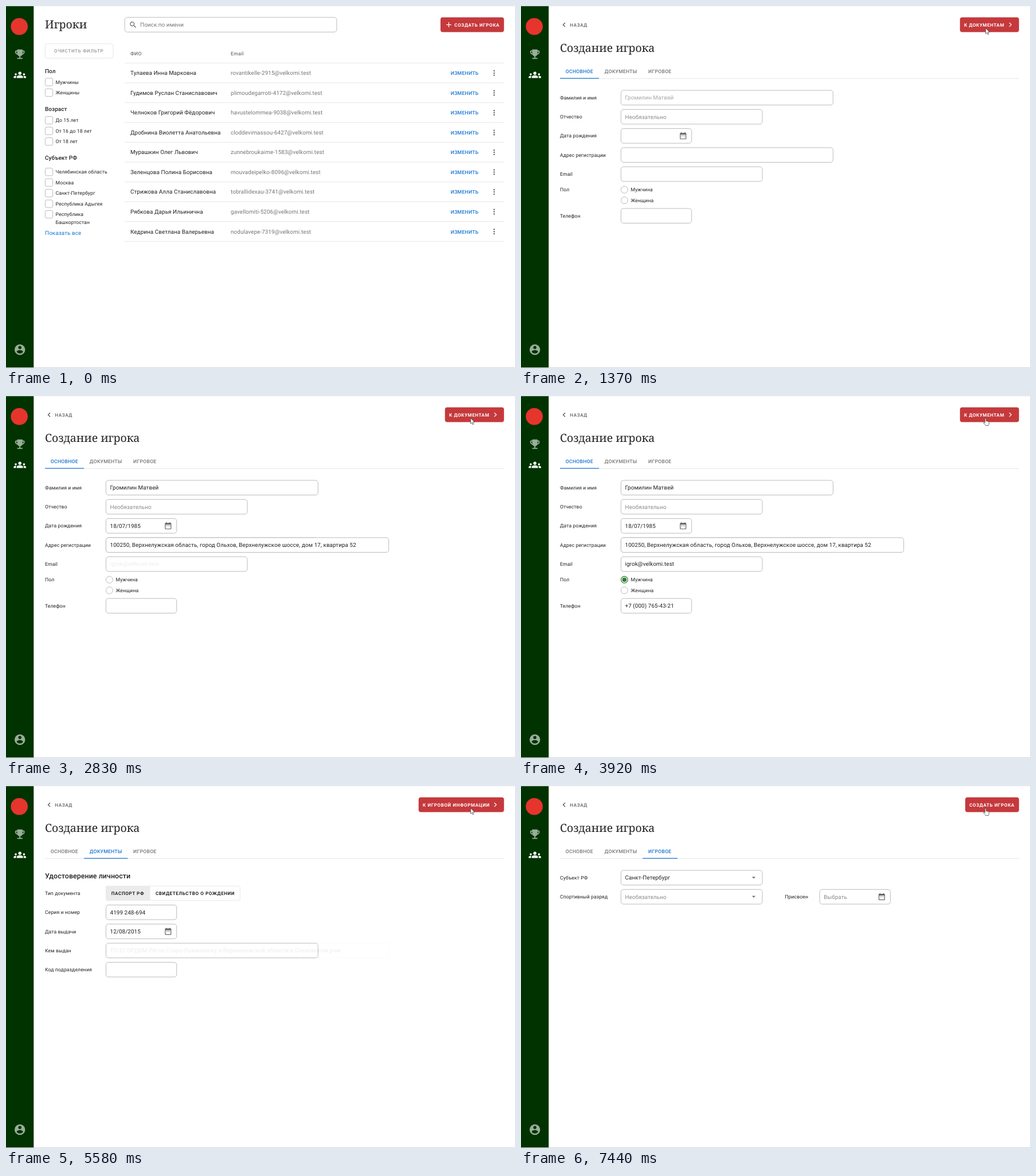
Recreate the animation shown at these times as an HTML page. Size 888 by 631 pixels, loop 8000 ms.

```html
<!DOCTYPE html>
<html lang="ru">
<head>
<meta charset="utf-8">
<title>Игроки</title>
<style>
  html, body { margin: 0; width: 100%; height: 100%; overflow: hidden; background: #fff; }
  svg { display: block; width: 888px; height: 631px; }
  text { font-family: Roboto, sans-serif; text-rendering: geometricPrecision; white-space: pre; fill: #212121; }
  .body { font-size: 9.87px; letter-spacing: .092px; }
  .small { font-size: 8.63px; letter-spacing: .1px; }
  .head { font-size: 9.87px; letter-spacing: .092px; font-weight: 500; }
  .sub { font-size: 12.33px; letter-spacing: .092px; font-weight: 500; }
  .caps { font-size: 8.63px; letter-spacing: .25px; font-weight: 500; }
  .btn { font-size: 8.02px; letter-spacing: .62px; font-weight: 700; }
  .title { font: 500 19.5px "Noto Serif", serif; }
  .grey { fill: #757575; }
  .hint { fill: #8a8a8a; }
  .blue { fill: #1976d2; }
  .white { fill: #fff; }
  .off { fill: #a6a6a6; }
  .box { fill: #fff; stroke: #b8b8b8; stroke-width: .95; }
  .rule { stroke: #e0e0e0; stroke-width: .8; }
</style>
</head>
<body>
<svg id="stage" viewBox="0 0 888 631" xmlns="http://www.w3.org/2000/svg"></svg>
<script>
const LOOP = 8000, TICK = 67;

const ICON = {
  cup: 'M19 5h-2V3H7v2H5c-1.1 0-2 .9-2 2v1c0 2.55 1.92 4.63 4.39 4.94.63 1.5 1.98 2.63 3.61 2.96V19H7v2h10v-2h-4v-3.1c1.63-.33 2.98-1.46 3.61-2.96C19.08 12.63 21 10.55 21 8V7c0-1.1-.9-2-2-2zM5 8V7h2v3.82C5.84 10.4 5 9.3 5 8zm14 0c0 1.3-.84 2.4-2 2.82V7h2v1z',
  group: 'M12 12.75c1.63 0 3.07.39 4.24.9 1.08.48 1.76 1.56 1.76 2.73V18H6v-1.61c0-1.18.68-2.26 1.76-2.73 1.17-.52 2.61-.91 4.24-.91zM4 13a2 2 0 1 0 0-4 2 2 0 0 0 0 4zm1.13 1.1C4.76 14 4.39 14 4 14c-.99 0-1.93.21-2.78.58C.48 14.9 0 15.62 0 16.43V18h4.5v-1.61c0-.83.23-1.61.63-2.29zM20 13a2 2 0 1 0 0-4 2 2 0 0 0 0 4zm4 3.43c0-.81-.48-1.53-1.22-1.85C21.93 14.21 21 14 20 14c-.39 0-.76 0-1.13.1.4.68.63 1.46.63 2.29V18H24zM12 6a3 3 0 1 1 0 6 3 3 0 0 1 0-6z',
  user: 'M12 2a10 10 0 1 0 0 20 10 10 0 0 0 0-20zm0 3a3 3 0 1 1 0 6 3 3 0 0 1 0-6zm0 14.2c-2.5 0-4.71-1.28-6-3.22.03-1.99 4-3.08 6-3.08s5.97 1.09 6 3.08c-1.29 1.94-3.5 3.22-6 3.22z',
  search: 'M15.5 14h-.79l-.28-.27A6.5 6.5 0 1 0 9.5 16c1.61 0 3.09-.59 4.23-1.57l.27.28v.79l5 4.99L20.49 19zm-6 0a4.5 4.5 0 1 1 0-9 4.5 4.5 0 0 1 0 9z',
  date: 'M9 11H7v2h2zm4 0h-2v2h2zm4 0h-2v2h2zm2-7h-1V2h-2v2H8V2H6v2H5a2 2 0 0 0-2 2v14c0 1.1.9 2 2 2h14c1.1 0 2-.9 2-2V6a2 2 0 0 0-2-2zm0 16H5V9h14z'
};

// Drawing helpers
const text = (x, y, s, cls = 'body') => `<text x="${x}" y="${y}" class="${cls}">${s}</text>`;
const rect = (x, y, w, h, r, attrs) => `<rect x="${x}" y="${y}" width="${w}" height="${h}" rx="${r}" ${attrs}/>`;
const line = (x1, x2, y, attrs = 'class="rule"') => `<path d="M${x1} ${y}H${x2}" ${attrs}/>`;
const icon = (name, x, y, fill, k = .617) =>
  `<path d="${ICON[name]}" fill="${fill}" transform="translate(${x} ${y}) scale(${k}) translate(-12 -12)"/>`;
const circle = (x, y, r, attrs) => `<circle cx="${x}" cy="${y}" r="${r}" ${attrs}/>`;
const chevron = (x, y, dir, color) =>
  `<path d="M${x - 1.8 * dir} ${y - 3.5}l${3.5 * dir} 3.5l${-3.5 * dir} 3.5" fill="none" stroke="${color}" stroke-width="1.25"/>`;
const shown = (from, to, s) => `<g data-from="${from}" data-to="${to}">${s}</g>`;
const fadeIn = (at, s) => `<g data-fade="${at}">${s}</g>`;

const box = (x, cy, w) => rect(x, cy - 12.8, w, 25.6, 4.3, 'class="box"');
const value = (cy, s, cls) => text(181.5, cy + 3.4, s, cls);
const label = (cy, s, x = 68) => text(x, cy + 3, s, 'small');
const calendar = (x, cy) => icon('date', x, cy, '#666');
const caret = cy => `<path d="M402.9 ${cy - 1.5}h6.2l-3.1 3.1z" fill="#757575"/>`;

function redButton(x, s, mark = '') {
  return rect(x, 19.8, 868.8 - x, 25.6, 4, 'fill="#c5393c"') + mark + text(x + (mark[1] === 'g' ? 24.3 : 7.2), 35.6, s, 'btn white');
}

function sidebar() {
  return rect(0, 0, 48.3, 630, 0, 'fill="#003300"') +
    line(0, 888, .2, 'stroke="#e4e4e4" stroke-width=".5"') +
    line(0, 888, 630.5, 'stroke="#d4d4d4"') +
    circle(23.2, 35.8, 14.8, 'fill="#e5352d"') +
    icon('cup', 24.2, 84, '#99ad99', .925) +
    icon('group', 24.2, 120, '#fff', .9) +
    icon('user', 24.2, 599, '#99ad99', .925);
}

function listPage() {
  const people = [
    ['Тулаева Инна Марковна', 'rovantikelle-2915'],
    ['Гудимов Руслан Станиславович', 'plimoudegarroti-4172'],
    ['Челноков Григорий Фёдорович', 'havustelommea-9038'],
    ['Дробнина Виолетта Анатольевна', 'cloddevimassou-6427'],
    ['Мурашкин Олег Львович', 'zunnebroukaime-1583'],
    ['Зеленцова Полина Борисовна', 'mouvadeipelko-8096'],
    ['Стрижова Алла Станиславовна', 'tobrallidexau-3741'],
    ['Рябкова Дарья Ильинична', 'gavellomiti-5206'],
    ['Кедрина Светлана Валерьевна', 'nodulavepe-7319']
  ];
  const checks = [
    [132.5, 'Мужчины'], [151, 'Женщины'],
    [199.2, 'До 15 лет'], [217.7, 'От 16 до 18 лет'], [236.2, 'От 18 лет'],
    [289.2, 'Челябинская область'], [307.7, 'Москва'], [326.2, 'Санкт-Петербург'],
    [344.7, 'Республика Адыгея'], [363.2, 'Республика']
  ];
  const plus = '<g><path d="M768.2 32.6h8.6M772.5 28.3v8.6" stroke="#fff" stroke-width="1.25"/></g>';
  let s = text(68, 39.3, 'Игроки', 'title') +
    box(207.2, 32.6, 369.8) + icon('search', 221.8, 32.8, '#666') + text(234, 36, 'Поиск по имени', 'body grey') +
    redButton(758, 'СОЗДАТЬ ИГРОКА', plus) +
    rect(68.3, 65.7, 118.6, 25.3, 4, 'fill="#fff" stroke="#e0e0e0" stroke-width=".8"') +
    text(84, 81.3, 'ОЧИСТИТЬ ФИЛЬТР', 'btn off') +
    text(68, 116.5, 'Пол', 'head') + text(68, 183.2, 'Возраст', 'head') + text(68, 268.3, 'Субъект РФ', 'head') +
    text(86.5, 380, 'Башкортостан', 'small') + text(68, 399, 'Показать все', 'body blue') +
    text(217, 85.6, 'ФИО', 'caps grey') + text(392, 85.6, 'Email', 'caps grey') + line(207, 869, 99.4);
  for (const [y, name] of checks)
    s += rect(68.4, y - 6.6, 13.2, 13.2, 2.2, 'class="box"') + text(86.5, y + 3, name, 'small');
  people.forEach(([name, mail], i) => {
    const y = 116.9 + 34.53 * i;
    s += text(217, y + 3.4, name) + text(392, y + 3.4, mail + '@velkomi.test', 'body grey') +
      text(775.8, y + 3.4, 'ИЗМЕНИТЬ', 'caps blue') + line(207, 869, y + 17.1);
    for (const d of [-3.8, 0, 3.8]) s += circle(851.6, y + d, 1.25, 'fill="#666"');
  });
  return s;
}

function formPage(active, button, x, next, content) {
  const tabs = [['ОСНОВНОЕ', 68, 136], ['ДОКУМЕНТЫ', 136, 212.3], ['ИГРОВОЕ', 212.3, 273]];
  let s = chevron(75.2, 32.8, -1, '#555') + text(85.3, 35.7, 'НАЗАД', 'btn grey') +
    text(68, 79.8, 'Создание игрока', 'title') +
    redButton(x, button, next ? chevron(853.7, 32.6, 1, '#fff') : '') +
    line(68, 869, 126.5);
  tabs.forEach(([name, a, b], i) => {
    s += text(a + 9.8, 117.2, name, 'caps ' + (i === active ? 'blue' : 'grey'));
    if (i === active) s += line(a, b, 126.2, 'stroke="#1976d2" stroke-width="1.2"');
  });
  return s + content;
}

function mainTab() {
  const X = 174.4;
  const address = '100250, Верхнелужская область, город Ольхов, Верхнелужское шоссе, дом 17, квартира 52';
  return label(159.8, 'Фамилия и имя') + box(X, 159.8, 370) + fadeIn(1300, value(159.8, 'Громилин Матвей')) +
    label(193.1, 'Отчество') + box(X, 193.1, 246.6) + value(193.1, 'Необязательно', 'body hint') +
    label(226.4, 'Дата рождения') + box(X, 226.4, 123.3) + calendar(282.8, 226.2) + fadeIn(1840, value(226.4, '18/07/1985')) +
    label(259.7, 'Адрес регистрации') + box(X, 259.7, 370) + fadeIn(2310, box(X, 259.7, 493.3) + value(259.7, address)) +
    label(293, 'Email') + box(X, 293, 246.6) + fadeIn(2770, value(293, 'igrok@velkomi.test')) +
    label(320.2, 'Пол') + label(320.2, 'Мужчина', 191.5) + label(338.7, 'Женщина', 191.5) +
    circle(180.4, 320.2, 6, 'class="box"') + circle(180.4, 338.7, 6, 'class="box"') +
    fadeIn(3180, circle(180.4, 320.2, 5.8, 'fill="#fff" stroke="#2e7d32" stroke-width="1.1"') + circle(180.4, 320.2, 3.8, 'fill="#2e7d32"')) +
    label(365.7, 'Телефон') + box(X, 365.7, 123.3) + fadeIn(3650, value(365.7, '+7 (000) 765-43-21'));
}

function papersTab() {
  const X = 174.4;
  const issuer = 'ТП 57 ОРДКМ РФ по Старо-Лужановску и Верхнелужской области в Ольховском р-не';
  return text(68, 161, 'Удостоверение личности', 'sub') +
    label(187, 'Тип документа') +
    rect(X, 174.4, 234, 25, 2.5, 'fill="#fff" stroke="#e4e4e4" stroke-width=".8"') +
    rect(174, 174, 77.5, 25.8, 2.5, 'fill="#ebebeb"') +
    text(183.8, 189.9, 'ПАСПОРТ РФ', 'btn') + text(261, 189.9, 'СВИДЕТЕЛЬСТВО О РОЖДЕНИИ', 'btn') +
    label(220.2, 'Серия и номер') + box(X, 220.2, 123.3) + fadeIn(4720, value(220.2, '4199 248-694')) +
    label(253.5, 'Дата выдачи') + box(X, 253.5, 123.3) + calendar(282.8, 253.3) + fadeIn(5180, value(253.5, '12/08/2015')) +
    label(286.8, 'Кем выдан') + box(X, 286.8, 370) + fadeIn(5580, box(X, 286.8, 493.3) + value(286.8, issuer)) +
    label(320.1, 'Код подразделения') + box(X, 320.1, 123.3) + fadeIn(6050, value(320.1, '123-456'));
}

function gameTab() {
  return label(159.8, 'Субъект РФ') + box(174.4, 159.8, 246.6) + caret(159.8) + fadeIn(7200, value(159.8, 'Санкт-Петербург')) +
    label(193.1, 'Спортивный разряд') + box(174.4, 193.1, 246.6) + value(193.1, 'Необязательно', 'body hint') + caret(193.1) +
    label(193.1, 'Присвоен', 460.3) + box(521.1, 193.1, 123.3) + text(528.3, 196.5, 'Выбрать', 'body hint') + calendar(629.4, 192.9);
}

const pointer = `<g id="pointer">
  <circle id="press" r="7.3" cx="0" cy="1.3" fill="#f5b921" opacity=".9"/>
  <path id="arrow" d="M0 0V9.7L2.2 7.7 3.7 11.2 5.3 10.5 3.8 7.1H6.9Z" fill="#fff" stroke="#333" stroke-width=".7"/>
  <path id="hand" transform="translate(-4.7 .4)" d="M3.5 1.2c0-1.4 2-1.4 2 0V5c.4-.6 1.6-.5 1.8.3.5-.5 1.5-.4 1.7.4.6-.4 1.6 0 1.6.9V9c0 2-1 2.1-1 3.4H4.6c0-1.2-2.2-2.3-3.6-4.3-.6-1.1.8-1.8 1.6-.9l.9.9Z" fill="#fff" stroke="#333" stroke-width=".7"/>
</g>`;

const stage = document.getElementById('stage');
stage.innerHTML = sidebar() +
  shown(0, 1170, listPage()) +
  shown(1170, 4510, formPage(0, 'К ДОКУМЕНТАМ', 765.8, true, mainTab())) +
  shown(4510, 6970, formPage(1, 'К ИГРОВОЙ ИНФОРМАЦИИ', 719.8, true, papersTab())) +
  shown(6970, LOOP, formPage(2, 'СОЗДАТЬ ИГРОКА', 775, false, gameTab())) +
  shown(440, LOOP, pointer);

const pages = [...stage.querySelectorAll('[data-from]')];
const fades = [...stage.querySelectorAll('[data-fade]')];
const [cursor, press, arrow, hand] = ['pointer', 'press', 'arrow', 'hand'].map(id => document.getElementById(id));

// Pointer turns into a hand at the first time, is pressed at the second, released at the third
const clicks = [[760, 1100, 1170], [3650, 4450, 4510], [6050, 6910, 6970], [7200, LOOP, LOOP]];

// Eased progress, advanced in ticks counted from its own start
function progress(t, start, length = 260) {
  if (t < start) return 0;
  const k = Math.min(1, (Math.floor((t - start) / TICK) * TICK + 45) / length);
  return k * k * (3 - 2 * k);
}

function draw(t) {
  for (const p of pages) p.style.display = t >= +p.dataset.from && t < +p.dataset.to ? '' : 'none';
  for (const f of fades) f.style.opacity = progress(t, +f.dataset.fade);

  const move = 1 - progress(t, 440, 400);
  cursor.setAttribute('transform', `translate(${810.6 + 28.4 * move} ${38.6 + 99.4 * move})`);
  const click = clicks.find(c => t < c[2]);
  const turn = progress(t, click[0]);
  arrow.style.opacity = 1 - turn;
  hand.style.opacity = turn;
  press.style.display = t >= click[1] ? '' : 'none';
}

function loop() {
  draw(performance.now() % LOOP);
  requestAnimationFrame(loop);
}
loop();
</script>
</body>
</html>
```
